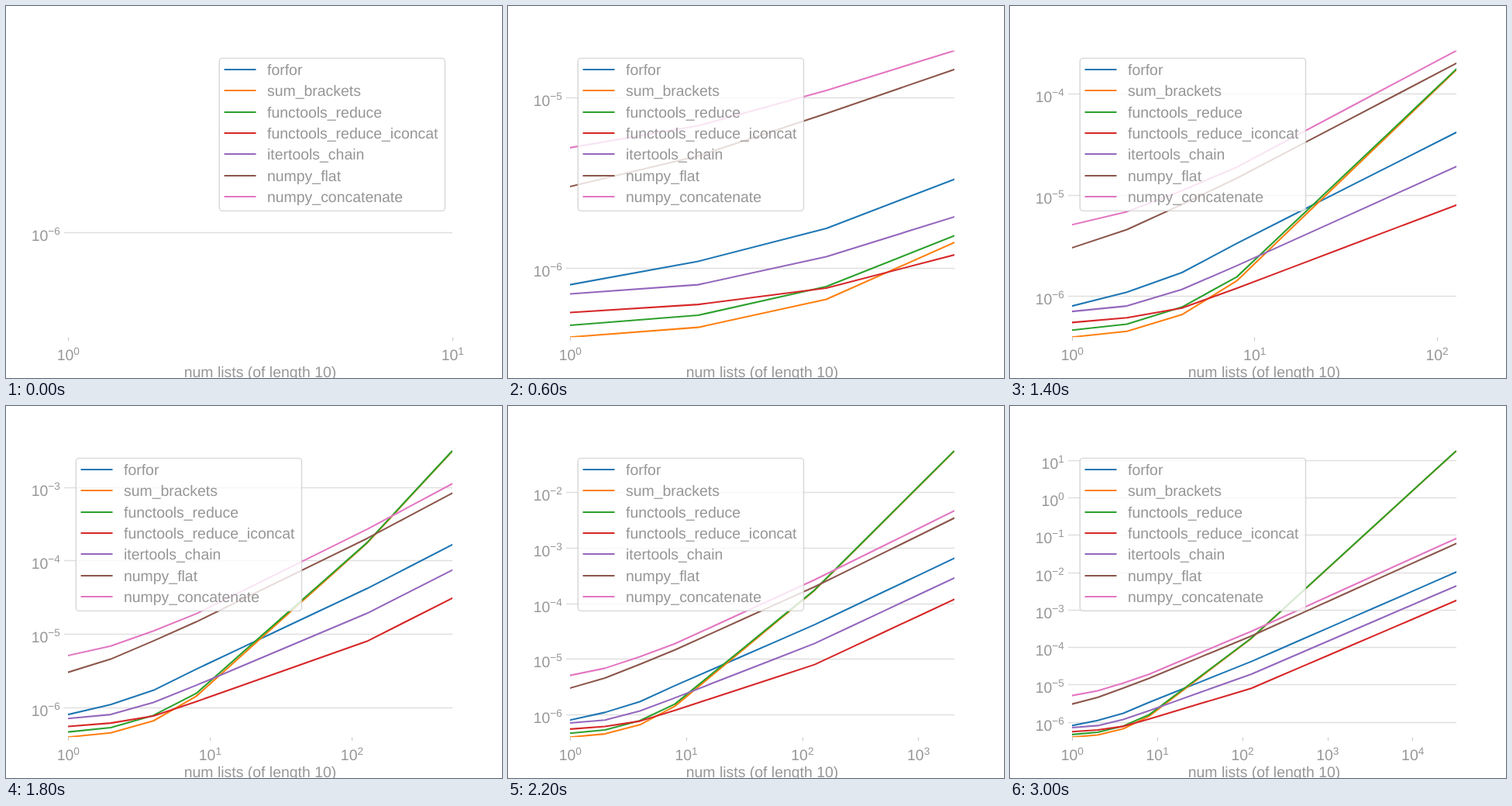
These frames come from a looping animation (640 by 480 pixels, 3200 ms). An HTML page:

```html
<!DOCTYPE html>
<html lang="en">
<head>
<meta charset="utf-8">
<title>Benchmark of list flattening</title>
<style>
  html, body { margin: 0; width: 100%; height: 100%; overflow: hidden; background: #fff; }
  svg { display: block; }
  text {
    font: 19.44px "Liberation Sans", Arial, sans-serif;
    fill: #969696; white-space: pre; text-rendering: geometricPrecision;
  }
  .sup { font-size: 13.6px; }
  .grid { stroke: #dfdfdf; stroke-width: 1.39; }
  .tick { stroke: #c8c8c8; }
  .series { fill: none; stroke-width: 2.08; stroke-linejoin: round; stroke-linecap: square; }
</style>
</head>
<body>
<svg width="640" height="480" viewBox="0 0 640 480">
  <clipPath id="plot"><rect x="80" y="57.6" width="496" height="369.6"/></clipPath>
  <g id="axes"></g>
  <g id="lines" clip-path="url(#plot)"></g>
  <g id="legend"></g>
  <text x="328" y="479.4" text-anchor="middle">num lists (of length 10)</text>
</svg>
<script>
const LEFT = 80, RIGHT = 576, TOP = 57.6, BOTTOM = 427.2;
const STEP = 200, STEPS = 16, DOUBLING = Math.log10(2);

// log10 of the run time after KEYS doublings of the list count, straight in between
const KEYS = [0, 1, 2, 3, 7, 15];
const series = [
  ["forfor", "#1f77b4", [-6.098, -5.961, -5.768, -5.48, -4.382, -1.99]],
  ["sum_brackets", "#ff7f0e", [-6.405, -6.348, -6.184, -5.85, -3.764, 1.252]],
  ["functools_reduce", "#2ca02c", [-6.336, -6.277, -6.109, -5.811, -3.757, 1.257]],
  ["functools_reduce_iconcat", "#d62728", [-6.261, -6.214, -6.118, -5.923, -5.1, -2.75]],
  ["itertools_chain", "#9467bd", [-6.152, -6.098, -5.934, -5.7, -4.72, -2.36]],
  ["numpy_flat", "#8c564b", [-5.523, -5.343, -5.095, -4.836, -3.7, -1.225]],
  ["numpy_concatenate", "#e377c2", [-5.295, -5.166, -4.959, -4.726, -3.575, -1.09]],
];

function runTime(keyed, i) {
  const k = Math.max(1, KEYS.findIndex(key => key >= i));
  const part = (i - KEYS[k - 1]) / (KEYS[k] - KEYS[k - 1]);
  return keyed[k - 1] + part * (keyed[k] - keyed[k - 1]);
}

const byId = id => document.getElementById(id);
const line = (x1, y1, x2, y2, attrs) =>
  `<line x1="${x1}" y1="${y1}" x2="${x2}" y2="${y2}" ${attrs}/>`;
const snap = v => Math.round(v) + 0.5;

function power(exp, x, y, anchor) {
  const label = String(exp).replace("-", "\u2212");
  return `<text x="${x}" y="${y}" text-anchor="${anchor}">10<tspan class="sup" dy="-7.3">${label}</tspan></text>`;
}

function draw(step) {
  const curves = series.map(([, , keyed]) =>
    Array.from({ length: step + 1 }, (_, i) => runTime(keyed, i)));
  const low = Math.min(...curves.flat()), high = Math.max(...curves.flat());
  const xMax = step ? step * DOUBLING : 1;
  const px = v => LEFT + v / xMax * (RIGHT - LEFT);
  const py = v => BOTTOM - (v - low) / (high - low) * (BOTTOM - TOP);

  let axes = "";
  for (let e = Math.ceil(low); e <= high; e++) {
    const y = snap(py(e));
    axes += line(75, y, RIGHT, y, 'class="grid"') + power(e, 69.8, y + 10, "end");
  }
  for (let e = 0; e <= xMax; e++) {
    const x = snap(px(e));
    axes += line(x, 427.5, x, 432, 'class="tick"') + power(e, px(e) + 0.3, 457.4, "middle");
  }
  byId("axes").innerHTML = axes;

  byId("lines").innerHTML = curves.map((curve, s) => {
    const points = curve.map((v, i) => `${px(i * DOUBLING).toFixed(2)},${py(v).toFixed(2)}`);
    // a single point has no line to show
    return step ? `<polyline class="series" stroke="${series[s][1]}" points="${points.join(" ")}"/>` : "";
  }).join("");

  // the legend moves to the emptier corner
  byId("legend").setAttribute("transform", `translate(${step < 3 ? 185 : 0})`);
}

byId("legend").innerHTML =
  '<rect x="90.3" y="67.4" width="291.2" height="197" rx="4" fill="#fff" fill-opacity=".8" stroke="#ccc" stroke-opacity=".8" stroke-width="1.39"/>' +
  series.map(([name, color], i) => {
    const y = 82.1 + i * 27.33;
    return line(97.6, Math.round(y), 136.5, Math.round(y), `class="series" stroke="${color}"`) +
      `<text x="152" y="${y + 6.9}">${name}</text>`;
  }).join("");

let shown = -1;
const start = performance.now();
function tick() {
  const step = Math.floor((performance.now() - start) / STEP) % STEPS;
  if (step !== shown) draw(shown = step);
  requestAnimationFrame(tick);
}
tick();
</script>
</body>
</html>
```
